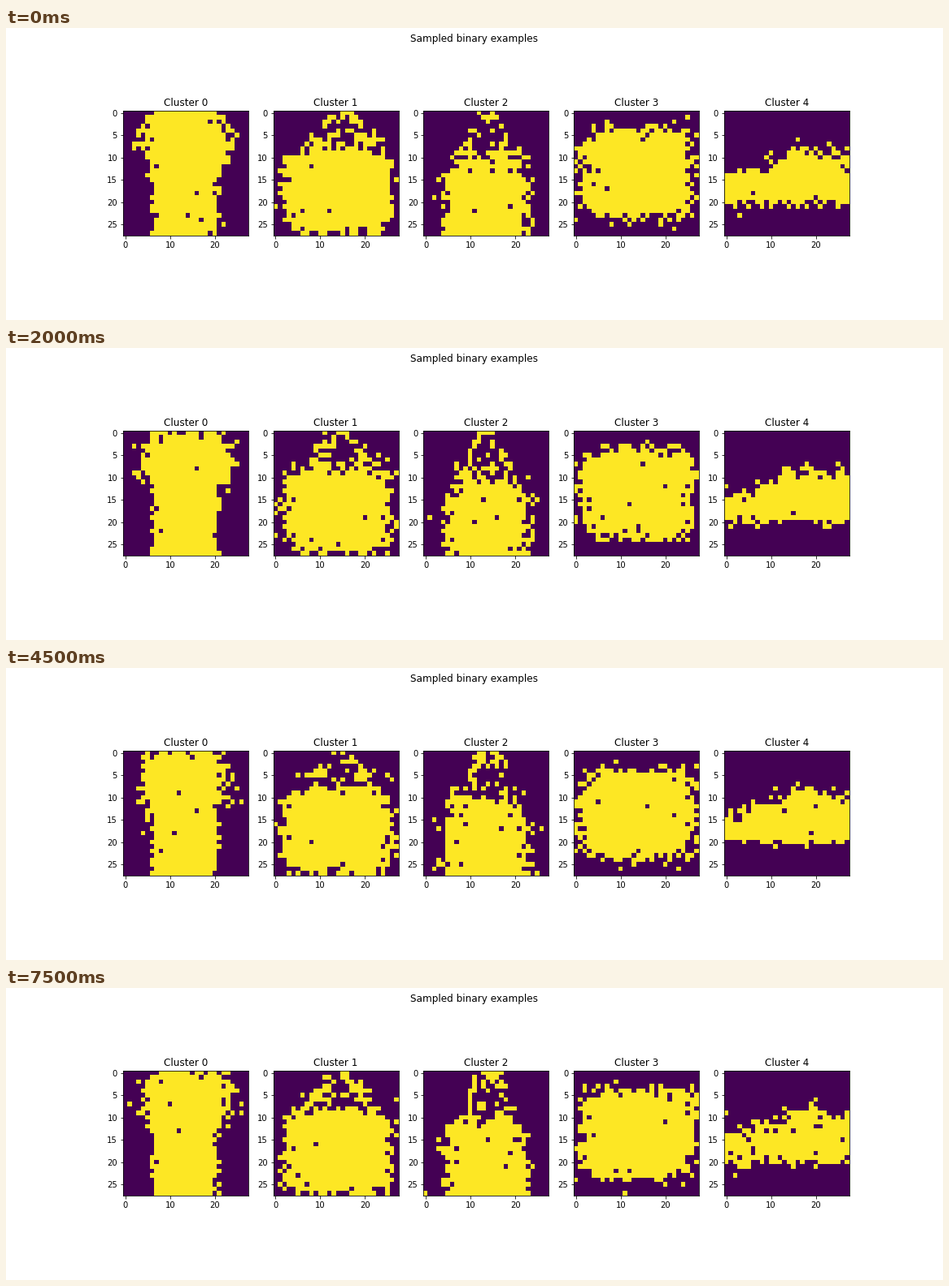
Recreate the animation shown at these times as a matplotlib script. Size 1152 by 360 pixels, loop 8 s.

```python
import numpy as np
import matplotlib.pyplot as plt
from matplotlib.animation import FuncAnimation

N = 28
FRAMES = 16
STEP_MS = 500
FILL = 0.99
Y, X = np.mgrid[0:N, 0:N]


def sigmoid(v):
    return 1 / (1 + np.exp(-np.clip(v, -40, 40)))


def blob(cx, cy, rx, ry, power, soft):
    """Superellipse with a soft edge."""
    d = np.abs((X - cx) / rx) ** power + np.abs((Y - cy) / ry) ** power
    return sigmoid((1 - d ** (1 / power)) / soft)


def arch(cx, base, rx, ry, width):
    """Blurry upper half of an ellipse, used for handles."""
    d = np.hypot((X - cx) / rx, (Y - base) / ry) - 1
    return np.exp(-((d / width) ** 2)) * (Y <= base)


def union(*maps):
    return 1 - np.prod([1 - m for m in maps], axis=0)


torso = blob(13.4, 16.5, 7.2, 17, 8, 0.05)
sleeves = blob(13.5, 6.3, 10, 6.6, 3, 0.08)
shirt = union(torso, sleeves)

wide_bag = union(
    blob(13.8, 17.6, 12.2, 9.4, 5, 0.05),
    0.55 * arch(14.8, 8, 5.3, 7, 0.25),
    0.3 * blob(14.5, 6.5, 9.5, 2.5, 3, 0.1),
)

tall_bag = union(
    blob(13.6, 21, 9.2, 10.5, 5, 0.08),
    0.65 * arch(14, 11, 4.1, 10.8, 0.24),
    0.25 * blob(13.6, 9, 7, 2.5, 3, 0.1),
)

box_bag = blob(13.6, 13.7, 13, 10, 5, 0.065)

# Low toe on the left, rising to the ankle with a small peak.
upper = (9.2 + 5 * sigmoid((7.5 - X) / 3)
         - 1.7 * np.exp(-((X - 17) / 3.5) ** 2))
shoe = sigmoid((Y - upper) / 0.8) * sigmoid((20.2 - Y) / 0.6)

clusters = [shirt, wide_bag, tall_bag, box_bag, shoe]


def sample(frame):
    rng = np.random.default_rng(40 + frame)
    return [rng.random((N, N)) < FILL * p for p in clusters]


plt.rcParams.update({"font.family": "DejaVu Sans", "font.size": 10})
fig, axes = plt.subplots(1, 5, figsize=(16, 5), dpi=72, facecolor="white")
fig.subplots_adjust(left=0.125, right=0.9, bottom=0.125, top=0.88, wspace=0.2)
fig.suptitle("Sampled binary examples", x=0.4994, fontsize=12)

images = []
for i, (ax, grid) in enumerate(zip(axes, sample(0))):
    images.append(ax.imshow(grid, cmap="viridis", vmin=0, vmax=1,
                            interpolation="nearest"))
    ax.set_title(f"Cluster {i}", fontsize=12)
    ax.set_xticks(range(0, N, 10))
    ax.set_yticks(range(0, N, 5))


def update(frame):
    for image, grid in zip(images, sample(frame)):
        image.set_data(grid)
    return images


anim = FuncAnimation(fig, update, frames=FRAMES, interval=STEP_MS,
                     repeat=True, repeat_delay=0, blit=False)
plt.show()
```
